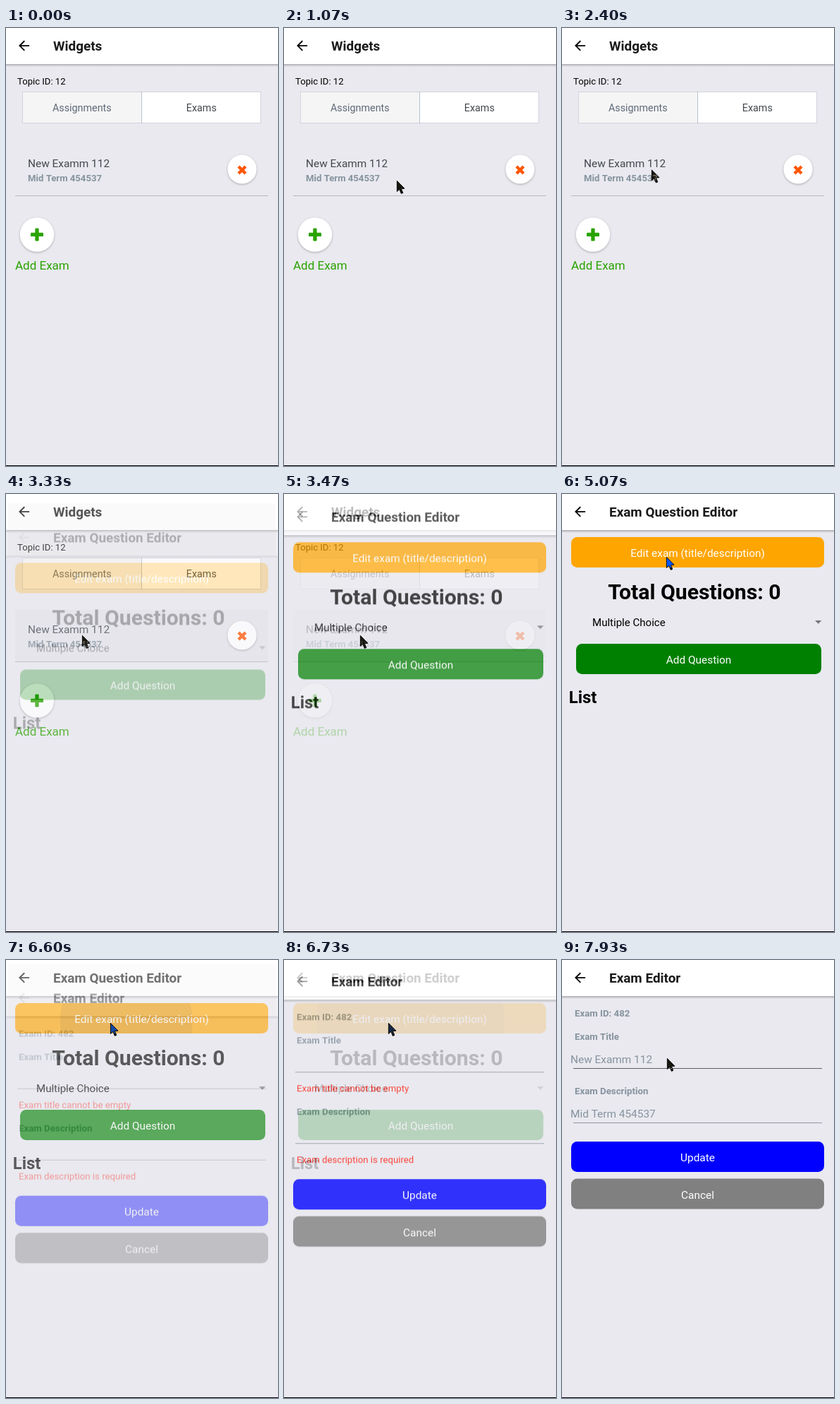
Write an HTML page with a canvas that moves like this. It is 386 px wide and 620 px high and loops after 8000 ms.

```html
<!DOCTYPE html>
<html lang="en">
<head>
<meta charset="utf-8">
<title>Exam editor</title>
<style>
html, body { margin: 0; width: 100%; height: 100%; overflow: hidden; background: #e9e9ef; }
canvas { display: block; width: 386px; height: 620px; }
</style>
</head>
<body>
<canvas id="stage"></canvas>
<script>
const W = 386, H = 620, LOOP = 8000, STEP = 1000 / 15;
const STATUS = 24;            // part of each page hidden above the stage
const SLIDE = 75, FADE = 560; // page transition distance and duration
const BG = '#e9e9ef', GREY = '#86939e', GREEN = '#2aa300';

const dpr = window.devicePixelRatio || 1;
const stage = document.getElementById('stage');
const layer = document.createElement('canvas');
stage.width = layer.width = Math.round(W * dpr);
stage.height = Math.round(H * dpr);
layer.height = Math.round((H + STATUS) * dpr);
const screen = stage.getContext('2d'), sheet = layer.getContext('2d');
const arrowIcon = new Path2D('M20 11H7.83l5.59-5.59L12 4l-8 8 8 8 1.41-1.41L7.83 13H20v-2z');

const clamp = v => Math.max(0, Math.min(1, v));
const smooth = v => v * v * (3 - 2 * v);

function rect(c, x, y, w, h, color) {
  c.fillStyle = color;
  c.fillRect(x, y, w, h);
}

function round(c, x, y, w, h, r, color) {
  c.beginPath();
  c.roundRect(x, y, w, h, r);
  c.fillStyle = color;
  c.fill();
}

function text(c, str, x, y, size, color, weight = 400, align = 'left') {
  c.font = `${weight} ${size}px Roboto, sans-serif`;
  c.textAlign = align;
  c.fillStyle = color;
  c.fillText(str, x, y);
}

function button(c, label, x, y, w, color, decorate) {
  round(c, x, y, w, 43, 8.5, color);
  if (decorate) decorate();
  text(c, label, x + w / 2, y + 28, 15.4, '#fff', 400, 'center');
}

function disc(c, x, y, r) {
  c.save();
  c.shadowColor = 'rgba(0,0,0,.28)';
  c.shadowBlur = 3 * dpr;
  c.shadowOffsetY = dpr;
  c.beginPath();
  c.arc(x, y, r, 0, 7);
  c.fillStyle = '#fff';
  c.fill();
  c.restore();
}

function header(c, title, arrowAlpha) {
  const shade = c.createLinearGradient(0, 51, 0, 55);
  shade.addColorStop(0, 'rgba(0,0,0,.26)');
  shade.addColorStop(1, 'rgba(0,0,0,0)');
  rect(c, 0, 51, W, 4, shade);
  rect(c, 0, -STATUS, W, 51 + STATUS, '#fff');
  text(c, title, 67, 32.3, 18.9, '#1a1a1c', 700);
  c.save();
  c.globalAlpha *= arrowAlpha;
  c.translate(14.3, 13.8);
  c.scale(.94, .94);
  c.fillStyle = '#000';
  c.fill(arrowIcon);
  c.restore();
}

function widgetsPage(c, t) {
  rect(c, 0, 0, W, H, BG);
  header(c, 'Widgets', 1);
  text(c, 'Topic ID: 12', 16, 79.7, 13.1, '#000');

  rect(c, 23, 90, 339, 45, '#d3d5dd');
  rect(c, 24, 91, 168, 43, '#f5f5f5');
  rect(c, 193, 91, 168, 43, '#fff');
  rect(c, 192, 90, 1, 45, '#b9bfcb');
  text(c, 'Assignments', 107.8, 118, 14.3, '#5e6977', 400, 'center');
  text(c, 'Exams', 277.3, 118, 14.3, '#43484d', 400, 'center');

  if (t > 3120) rect(c, 13, 164, 359, 73, 'rgba(0,0,0,.02)');
  text(c, 'New Examm 112', 31, 197, 15.4, '#43484d');
  text(c, 'Mid Term 454537', 31, 216.5, 13.15, GREY, 700);
  rect(c, 13, 237, 359, 1, '#b6b6bd');

  disc(c, 335, 200, 20.6);
  c.strokeStyle = '#ff5600';
  c.lineWidth = 4.3;
  c.beginPath();
  c.moveTo(330, 196); c.lineTo(340, 206);
  c.moveTo(340, 196); c.lineTo(330, 206);
  c.stroke();

  disc(c, 44, 292.5, 24.3);
  round(c, 35, 289.8, 18, 5.3, 1.2, GREEN);
  round(c, 41.3, 283.5, 5.3, 18, 1.2, GREEN);
  text(c, 'Add Exam', 13, 342, 17, GREEN);
}

function ripple(c, t) {
  const k = clamp((t - 6280) / 640);
  if (!k) return;
  c.save();
  c.beginPath();
  c.roundRect(13, 61, 359, 43, 8.5);
  c.clip();
  c.beginPath();
  c.arc(149 + 43.5 * k, 90 - 7 * k, 188 * k, 0, 7);
  c.fillStyle = 'rgba(0,0,0,.09)';
  c.fill();
  c.restore();
}

function questionPage(c, t, arrowAlpha) {
  rect(c, 0, 0, W, H, BG);
  header(c, 'Exam Question Editor', arrowAlpha);
  button(c, 'Edit exam (title/description)', 13, 61, 359, '#ffa500', () => ripple(c, t));
  text(c, 'Total Questions: 0', 188, 148.5, 30.2, '#000', 700, 'center');
  text(c, 'Multiple Choice', 43, 186.5, 15.05, '#000');
  c.beginPath();
  c.moveTo(359, 179); c.lineTo(368.4, 179); c.lineTo(363.7, 183.7);
  c.fillStyle = '#77777b';
  c.fill();
  button(c, 'Add Question', 20, 212, 348, '#008000');
  text(c, 'List', 9.8, 296, 23.9, '#000', 700);
}

function field(c, label, value, error, y, line) {
  text(c, label, 18, y, 13.25, GREY, 700);
  text(c, value, 12, y + 32.5, 15.4, GREY);
  rect(c, 16, y + 40, 353, 1, line);
  text(c, error, 18, y + 67.5, 13.2, '#ff190c');
}

function editorPage(c, t, arrowAlpha) {
  const ready = t > 6795, gap = ready ? 0 : 24;
  const line = '#92979e';
  const focus = t > 7925 ? '#5f6166' : t > 7860 ? '#787b81' : line;
  rect(c, 0, 0, W, H, BG);
  header(c, 'Exam Editor', arrowAlpha);
  text(c, 'Exam ID: 482', 18, 79.7, 13.25, GREY, 700);
  field(c, 'Exam Title', ready ? 'New Examm 112' : '', ready ? '' : 'Exam title cannot be empty', 113, focus);
  field(c, 'Exam Description', ready ? 'Mid Term 454537' : '', ready ? '' : 'Exam description is required', 190 + gap, line);
  button(c, 'Update', 13, 257 + 2 * gap, 359, '#0000ff');
  button(c, 'Cancel', 13, 309.5 + 2 * gap, 359, '#808080');
}

// Fades a page in while it rises; progress eases out with the fifth power.
function enter(page, t, start) {
  const age = t - start;
  const p = 1 - (1 - clamp(age / FADE)) ** 5;
  const alpha = p < .5 ? p / 2 : p < .9 ? .25 + (p - .5) * 1.125 : .7 + (p - .9) * 3;
  const dy = SLIDE * (1 - p);

  sheet.setTransform(dpr, 0, 0, dpr, 0, STATUS * dpr);
  sheet.clearRect(0, -STATUS, W, H + STATUS);
  page(sheet, t, clamp(age / 480));

  rect(screen, 3, dy - STATUS + 1, W - 6, 75, `rgba(0,0,0,${.06 * (1 - p)})`);
  screen.globalAlpha = alpha;
  screen.drawImage(layer, 0, dy - STATUS, W, H + STATUS);
  screen.globalAlpha = 1;
}

const outEase = v => 1 - (1 - v) ** 2.4;
const moves = [
  { from: 267, to: 1067, x: 160, y: 216, ease: smooth },
  { from: 1067, to: 1333, x: 146, y: 201, ease: smooth },
  { from: 2333, to: 2600, x: 108, y: 200, ease: outEase },
  { from: 4200, to: 5067, x: 148, y: 89, ease: smooth, bend: [30, 150] },
  { from: 7133, to: 7333, x: 153, y: 125, ease: smooth },
  { from: 7400, to: 7533, x: 149, y: 139, ease: smooth }
];

function pointer(t) {
  let x = 363, y = 604;
  for (const m of moves) {
    if (t <= m.from) break;
    const k = m.ease(clamp((t - m.from) / (m.to - m.from)));
    const [bx, by] = m.bend || [(x + m.x) / 2, (y + m.y) / 2];
    const a = (1 - k) ** 2, b = 2 * k * (1 - k), d = k * k;
    x = a * x + b * bx + d * m.x;
    y = a * y + b * by + d * m.y;
  }
  return [x, y];
}

// The pointer inverts whatever lies below it.
function drawPointer(c, t) {
  const [x, y] = pointer(t);
  c.save();
  c.translate(x, y);
  c.beginPath();
  c.moveTo(.4, .4);
  c.lineTo(.4, 15.6);
  c.lineTo(3.8, 12.4);
  c.lineTo(6.4, 18.4);
  c.lineTo(8.8, 17.4);
  c.lineTo(6.4, 11.6);
  c.lineTo(11, 11.2);
  c.closePath();
  c.globalCompositeOperation = 'difference';
  c.fillStyle = '#fff';
  c.fill();
  c.globalCompositeOperation = 'source-over';
  c.strokeStyle = '#000';
  c.lineWidth = .9;
  c.stroke();
  c.restore();
}

function draw(now) {
  const t = Math.floor((now % LOOP + 5) / STEP) * STEP % LOOP;
  const c = screen;
  c.setTransform(dpr, 0, 0, dpr, 0, 0);
  if (t < 3725) widgetsPage(c, t);
  else if (t < 6925) questionPage(c, t, 1);
  else editorPage(c, t, 1);
  if (t > 3325 && t < 3725) enter(questionPage, t, 3258);
  if (t > 6595 && t < 6925) enter(editorPage, t, 6502);
  rect(c, 0, 619, W, 1, '#000');
  if (t > 260) drawPointer(c, t);
}

function tick() {
  draw(performance.now());
  requestAnimationFrame(tick);
}
tick();
</script>
</body>
</html>
```
